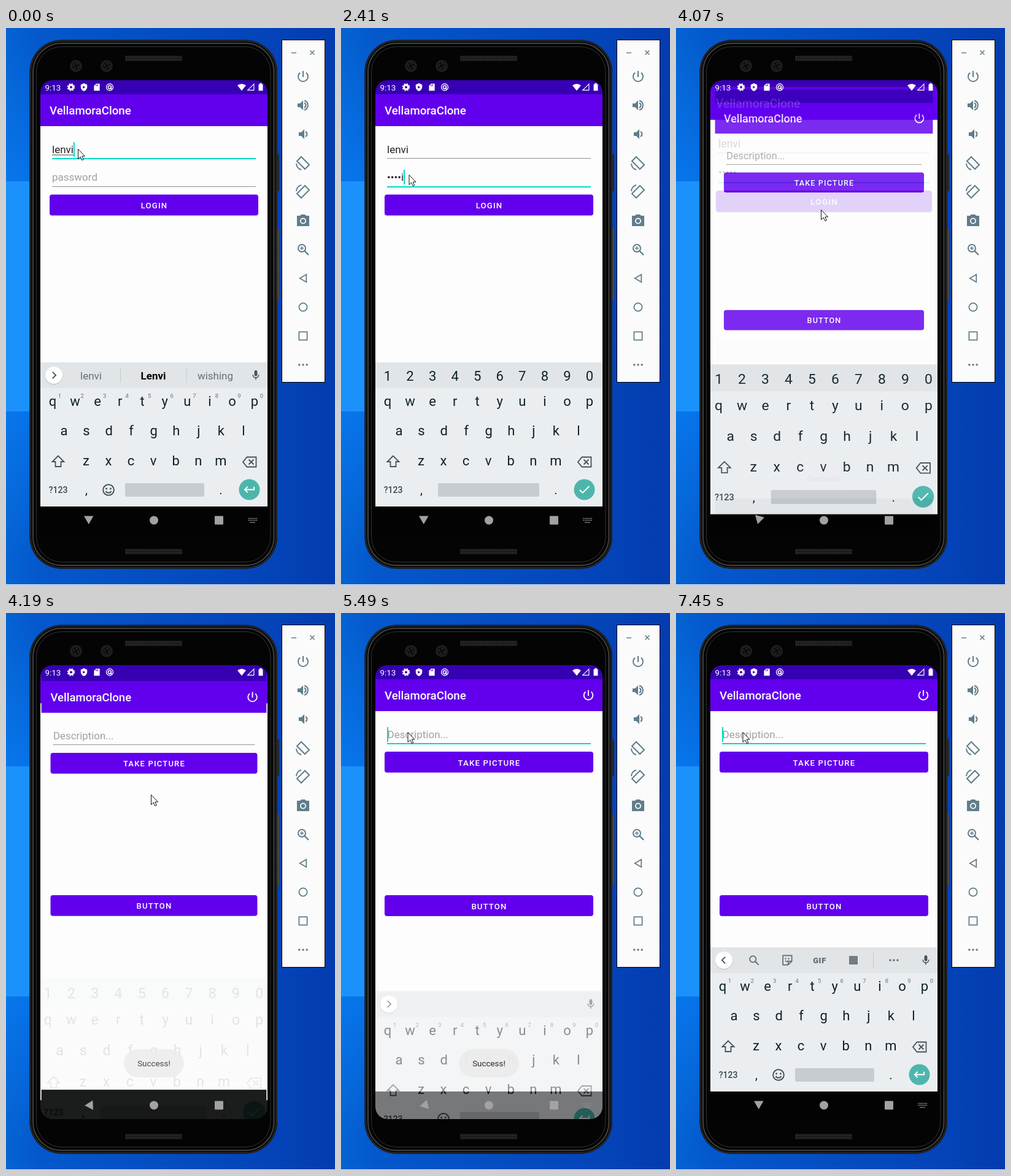
An HTML page for the animation above (8000 ms loop, 536x908 px).

```html
<!DOCTYPE html>
<html lang="en">
<head>
<meta charset="utf-8">
<title>Login demo</title>
<style>
html, body { margin: 0; width: 100%; height: 100%; overflow: hidden; }
svg { display: block; width: 536px; height: 908px; font-family: Roboto, sans-serif; }
.mid { text-anchor: middle; }
.line { fill: none; stroke: currentColor; }
</style>
</head>
<body>
<script>
const APP = 'VellamoraClone', USER = 'lenvi', SECRET = 'lenvi';
const PURPLE = '#6200ee', TEAL = '#03dac5', INK = '#0f2129', SLATE = '#607d8b', KEY = '#455258', TOOL = '#5f6a70';

// Markup helpers
const rect = (x, y, w, h, fill, more = '') =>
  `<rect x="${x}" y="${y}" width="${w}" height="${h}" fill="${fill}" ${more}/>`;
const disc = (x, y, r, fill, more = '') => `<circle cx="${x}" cy="${y}" r="${r}" fill="${fill}" ${more}/>`;
const text = (x, y, size, str, fill, more = '') =>
  `<text x="${x}" y="${y}" font-size="${size}" fill="${fill}" ${more}>${str}</text>`;
const mid = (x, y, size, str, fill, more = '') => text(x, y, size, str, fill, 'class="mid" ' + more);
const shape = (d, more = '') => `<path d="${d}" fill="currentColor" ${more}/>`;
const line = (d, w = 2, more = '') => `<path class="line" d="${d}" stroke-width="${w}" ${more}/>`;
const ring = (x, y, r, w = 2, more = '') => disc(x, y, r, 'none', `class="line" stroke-width="${w}" ${more}`);
const group = (id, body) => `<g id="${id}">${body}</g>`;
// Icons live on a 24-unit grid, placed by their centre
const icon = (x, y, scale, color, body, more = '') =>
  `<g color="${color}" transform="translate(${x} ${y}) scale(${scale}) translate(-12 -12)" ${more}>${body}</g>`;

const POWER = line('M12 3V13M7 5.9A8 8 0 1 0 17 5.9');
const SPEAKER = 'M3 9v6h4l5 5V4L7 9z';
const MIC = shape('M12 14a3 3 0 0 0 3-3V5a3 3 0 0 0-6 0v6a3 3 0 0 0 3 3z') + line('M6 11a6 6 0 0 0 12 0M12 17v4');
const DOTS = [5, 12, 19].map(x => disc(x, 12, 2, 'currentColor')).join('');
const LENS = ring(10, 10, 6) + line('M14.5 14.5L21 21', 2.4);
const ROTATE = line('M9 2L2 9L15 22L22 15Z') + line('M1 13A11 11 0 0 0 9 23');
const SMILE = ring(12, 12, 9) + disc(8.5, 10, 1.5, 'currentColor') + disc(15.5, 10, 1.5, 'currentColor') +
  line('M7.5 14a5 5 0 0 0 9 0');

// App screens
const button = (y, label, id = '') =>
  rect(71, y + 1, 340, 34, '#000', `rx="4" opacity=".1" ${id && `id="${id}Shadow"`}`) +
  rect(71, y, 340, 34, PURPLE, 'rx="4"') +
  (id && `<g clip-path="url(#${id}Clip)"><circle id="ripple" cx="238" cy="288" fill="#fff"/></g>`) +
  mid(241.5, y + 22.5, 13.2, label, '#fff', 'font-weight="500" letter-spacing="1.15"');

const activity = body =>
  rect(56, 780, 370, 45, '#030303') + rect(56, 160, 370, 620, '#fdfdfd') +
  rect(56, 85, 370, 23, '#3700b3') + rect(56, 108, 370, 52, PURPLE) +
  text(71, 141, 18.7, APP, '#fff', 'font-weight="500"') + body;

const field = (id, y) => `<rect id="${id}" x="75" y="${y}" width="332"/>`;

const login = activity(
  text(75, 204, 17, USER, '#222', 'id="user"') + rect(75, 206.5, 35, 1, '#444', 'id="composing"') + field('userLine', 212) +
  text(75, 249, 17, 'password', '#a0a0a0', 'id="hint"') + text(75, 249, 17, '', '#222', 'id="pass"') + field('passLine', 258) +
  button(271.5, 'LOGIN', 'login'));

const post = activity(
  icon(403, 134, .92, '#fff', POWER) +
  text(75.5, 204, 17, 'Description...', '#a0a0a0') + field('descLine', 212) +
  button(226, 'TAKE PICTURE') + button(460, 'BUTTON'));

// Keyboard
const keys = (letters, x, y) =>
  [...letters].map((c, i) => mid(x + 36.55 * i, y, 22, c, INK)).join('');
const keyboard = (spaceX, action) =>
  rect(56, 545, 370, 235, '#ebeef1') + rect(56, 545, 370, 42, '#e1e5e8') +
  ['qwertyuiop', 'asdfghjkl', 'zxcvbnm'].map((row, i) => keys(row, [76, 94.5, 130.5][i], 616.3 + 48.1 * i)).join('') +
  icon(85, 706.5, 1, KEY, line('M12 3L2.5 12.5H7.5V20.5H16.5V12.5H21.5Z', 1.8)) +
  icon(396.5, 707.5, 1, KEY, line('M8 4H23V20H8L1.5 12ZM11 8l8 8M19 8l-8 8', 1.8)) +
  mid(85, 758, 14, '?123', '#37474f', 'font-weight="500"') + mid(131, 760, 20, ',', INK) + mid(350, 760, 20, '.', INK) +
  rect(spaceX, 742, 323 - spaceX, 22, '#c7ccd0', 'rx="2"') +
  disc(396.5, 752.5, 17, '#4db6ac') + icon(396.5, 752.5, .95, '#fff', line(action));
const numberKeys = keyboard(158, 'M4 12.5l5 5L20.5 6') + keys('1234567890', 76, 575);
const dividerAt = x => rect(x, 554, 1, 24, '#c3c9cd');
const letterKeys = keyboard(194, 'M20 7v5H4M9 7l-5 5 5 5') +
  [...'1234567890'].map((c, i) => mid(87.5 + 36.55 * i, 603, 9.5, c, '#687379')).join('') +
  icon(167, 753, .98, KEY, SMILE) +
  disc(78, 567, 14.5, '#000', 'opacity=".13"') + disc(78, 566, 14, '#fff') +
  icon(78, 566, .9, KEY, line('M9.5 6l6 6-6 6'), 'id="more"') +
  icon(78, 566, .9, KEY, line('M14.5 6l-6 6 6 6'), 'id="less"') +
  icon(407, 566, .8, KEY, MIC) +
  group('words', mid(138.5, 573, 17, USER, '#667076') + dividerAt(186) +
    mid(240, 573, 17, USER[0].toUpperCase() + USER.slice(1), '#000', 'font-weight="700"') +
    dividerAt(293.5) + mid(341, 573, 17, 'wishing', '#667076')) +
  group('tools', icon(127, 566, .85, TOOL, LENS) +
    icon(181, 566, .85, TOOL, line('M4 3H21V14L14 21H4ZM14 21V14H21') +
      disc(9, 9, 1.4, 'currentColor') + disc(15, 9, 1.4, 'currentColor') + line('M8 13q3 3 6 0', 1.6)) +
    mid(234, 570.5, 13, 'GIF', TOOL, 'font-weight="900" letter-spacing=".6"') +
    rect(282, 559, 14, 14, '#727c81') + dividerAt(321) + icon(355, 566, .85, TOOL, DOTS));

// System bars
const statusIcons = text(63.5, 101.5, 13.4, '9:13', '#fff') + [
  [106, ring(12, 12, 6, 5) + ring(12, 12, 9.3, 3, 'stroke-dasharray="4.2 3.1"')],
  [127, shape('M12 1L21 5v6c0 5.5-4 10.5-9 12-5-1.5-9-6.5-9-12V5zM9 8v8l7-4z', 'fill-rule="evenodd"')],
  [148, shape('M10 2h10v20H4V8zM9 5v4h2V5zM13 4v5h2V4z', 'fill-rule="evenodd"')],
  [169, ring(12, 12, 9.5, 2.2) + ring(12, 12, 4.5, 2.6) + line('M13 13l5 6', 2.6)],
  [384, shape('M0 7Q12-2 24 7L12 22z')],
  [399, line('M3 20.5H20.5V3Z')],
  [415, shape('M9 1h6v3h3v18H6V4h3z')]
].map(([x, body]) => icon(x, 96.5, .58, '#fff', body)).join('');

const navIcons = shape('M127 795.5H142.5L134.7 809Z', 'id="back"') +
  disc(241, 802.5, 7, 'currentColor') + rect(340, 795.5, 14, 14, 'currentColor', 'rx="1"') +
  group('imeIcon', line('M394.5 799.5H409M394.5 802.5H409', 1.4, 'stroke-dasharray="1.5 1.1"') + line('M397 806H406', 1.2));

// Phone body and emulator panel
const grille = y => rect(194, y, 93, 9, '#191919', 'rx="1"') +
  line(`M195 ${y + 2.5}H287M195 ${y + 6.5}H287`, 2, 'color="#303030" stroke-dasharray="2 1.5"');
const camera = x => disc(x, 62, 10, '#1d1d20') + disc(x, 62, 6, '#0c0c10') + ring(x, 62, 4, 1.5, 'color="#35353a" stroke-dasharray="3 3"');
const edge = (inset, color, w) => rect(38.5 + inset, 19.5 + inset, 403.5 - 2 * inset, 862 - 2 * inset, 'none',
  `rx="${52 - inset}" stroke="${color}" stroke-width="${w}"`);
const phone = rect(440, 206, 5, 60, '#26282d') + rect(440, 327, 5, 117, '#49443a') + rect(440, 328, 2, 115, '#111') +
  rect(38.5, 19.5, 403.5, 862, '#040404', 'rx="52"') + edge(1.5, '#222', 3) + edge(5.5, '#424242', 2) +
  edge(11, '#333', 1) + camera(114) + camera(164) + grille(45) + grille(849);

const panelIcons = [
  POWER,
  shape(SPEAKER) + line('M14 8a4.5 4.5 0 0 1 0 8M14 4.3a8 8 0 0 1 0 15.4'),
  shape(SPEAKER, 'transform="translate(2)"') + line('M16 8a4.5 4.5 0 0 1 0 8'),
  ROTATE,
  `<g transform="matrix(1 0 0 -1 0 24)">${ROTATE}</g>`,
  shape('M9 2L7 4H2V21H22V4H17L15 2z') + disc(12, 12.5, 5, '#fbfbfb') + disc(12, 12.5, 3.2, 'currentColor'),
  LENS + line('M10 7v6M7 10h6', 1.5),
  line('M18 5V19L6 12Z'),
  ring(12, 12, 7.5),
  line('M4.5 4.5h15v15h-15z'),
  DOTS
];
const panel = rect(449.5, 19.5, 70, 558, '#fbfbfb', 'stroke="#000"') +
  line('M465 40.5H473M495.5 36.5l7 7M502.5 36.5l-7 7', 1.5, `color="${SLATE}"`) +
  panelIcons.map((body, i) => icon(484, 79 + 47 * i, i < 7 ? 1 : .88, SLATE, body)).join('');

document.body.innerHTML = `<svg viewBox="0 0 536 908">
<defs>
  <linearGradient id="wall"><stop stop-color="#0563d2"/><stop offset=".1" stop-color="#0458cc"/>
    <stop offset=".82" stop-color="#0443b8"/><stop offset="1" stop-color="#033cae"/></linearGradient>
  <radialGradient id="glow"><stop stop-color="#0a86ff"/><stop offset="1" stop-color="#0a86ff" stop-opacity="0"/></radialGradient>
  <clipPath id="screen">${rect(56, 85, 370, 740, '#000', 'rx="20"')}</clipPath>
  <clipPath id="loginClip">${rect(71, 271.5, 340, 34, '#000', 'rx="4"')}</clipPath>
</defs>
${rect(0, 0, 536, 908, 'url(#wall)')}${disc(0, 440, 420, 'url(#glow)')}${rect(-333, 250, 375, 375, '#1b92fb')}
${rect(0, 907, 536, 1, '#fff')}
${phone}
<g clip-path="url(#screen)">
  ${group('old', login)}${group('next', post)}
  ${rect(0, 0, 2, 24, TEAL, 'id="caret"')}
  ${group('kb', group('numberKeys', numberKeys) + group('letterKeys', letterKeys))}
  ${group('toast', rect(192, 711, 98, 46, '#ececec', 'rx="23"') + mid(241, 739, 13.4, 'Success!', '#222'))}
  ${statusIcons}<g color="#a3a1a3">${navIcons}</g>
</g>
${panel}
<path id="mouse" d="M.5.5V16.5L4.2 13 6.8 18.5 9.3 17.4 6.8 12H11.5Z" fill="#fff" stroke="#111"/>
</svg>`;

// Timeline, in ms
const LOOP = 8000, STEP = 130, BLINK = 527;
const FOCUS_PASS = 1120, PRESS = 3520, OPEN = 4040, FOCUS_DESC = 5340;
const keyTimes = [1700, 1980, 2130, 2280, 2410];
const touches = [-257, FOCUS_PASS, ...keyTimes, FOCUS_DESC];
const mouseHome = [117, 197];
const mouseMoves = [
  { from: 140, to: 790, x: 110.5, y: 239 },
  { from: 2740, to: 3260, x: 236, y: 296 },
  { from: 4690, to: 5340, x: 108.5, y: 194 }
];

const ramp = (t, a, b) => Math.min(1, Math.max(0, (t - a) / (b - a)));
const smooth = u => u * u * (3 - 2 * u);
// Moving parts advance in steps, like a screen recording
const stepped = t => 10 + STEP * Math.floor((t - 10) / STEP);

const el = id => document.getElementById(id);
const set = (id, attrs) => { for (const k in attrs) el(id).setAttribute(k, attrs[k]); };
const show = (id, opacity) => set(id, { opacity: +opacity });
const zoom = (s, dy = 0) => `translate(241 ${455 + dy}) scale(${s}) translate(-241 -455)`;
const focus = (id, on) => set(id, { height: on ? 2 : 1, fill: on ? TEAL : '#8f8f8f' });

function drawInput(t, opened) {
  const onUser = t < FOCUS_PASS, onDesc = t >= FOCUS_DESC;
  focus('userLine', onUser);
  focus('passLine', !onUser);
  focus('descLine', onDesc);
  show('composing', onUser);
  show('words', onUser);

  const count = keyTimes.filter(k => k <= t).length;
  const hidden = opened ? count : Math.max(count - 1, 0);
  el('pass').textContent = '•'.repeat(hidden) + SECRET.slice(hidden, count);
  show('hint', !count);

  const typedWidth = onDesc ? 0 : el(onUser ? 'user' : 'pass').getComputedTextLength();
  const idle = t - touches.findLast(k => k <= t);
  const lit = Math.floor(idle / BLINK) % 2 === 0 && (!opened || onDesc);
  set('caret', { x: 75 + typedWidth, y: onUser || onDesc ? 186 : 231, opacity: +lit });
}

function drawWindows(q) {
  const glide = q < OPEN ? 0 : 1 - Math.exp((OPEN - STEP - q) / 86);
  set('old', { transform: zoom(1 + .046 * glide) });
  set('next', { transform: zoom(1 - .186 * (1 - glide)), opacity: ramp(q, 3932, 4062) });

  const pressed = q >= PRESS && q < OPEN;
  set('ripple', { r: pressed ? .8 * (q - 3352) : 0, opacity: .25 * (1 - ramp(q, 3650, 3960)) });
  set('loginShadow', { y: pressed ? 275 : 272.5 });

  // The keyboard leaves with the old window and slides back in later
  const rise = ramp(q, FOCUS_DESC, 5600), reopening = q >= FOCUS_DESC;
  set('kb', reopening
    ? { transform: zoom(1, 286 * (1 - rise) ** 2), opacity: rise }
    : { transform: zoom(1 + .05 * glide, 47 * ramp(q, OPEN, 4170)), opacity: 1 - ramp(q, 4034, 4186) });
  const numeric = q >= FOCUS_PASS - STEP / 2 && !reopening;
  show('numberKeys', numeric);
  show('letterKeys', !numeric);

  const tools = ramp(q, 5730, 5990);
  show('tools', tools);
  show('less', tools);
  show('more', 1 - tools);

  show('toast', .95 * ramp(q, 4032, 4192) * (1 - ramp(q, 6000, 6200)));
  show('imeIcon', reopening ? rise : q < OPEN);
  const turn = ramp(q, 4014, 4174) - ramp(q, 5412, 5822);
  set('back', { transform: `rotate(${90 * turn} 134.7 802.5)` });
}

function drawMouse(q) {
  let [x, y] = mouseHome;
  for (const m of mouseMoves) {
    const u = smooth(ramp(q, m.from, m.to));
    x += (m.x - x) * u;
    y += (m.y - y) * u;
  }
  set('mouse', { transform: `translate(${x} ${y})` });
}

function draw(t) {
  const q = stepped(t);
  drawInput(t, q >= OPEN);
  drawWindows(q);
  drawMouse(q);
}

const start = performance.now();
function tick() {
  draw((performance.now() - start) % LOOP);
  requestAnimationFrame(tick);
}
tick();
</script>
</body>
</html>
```
